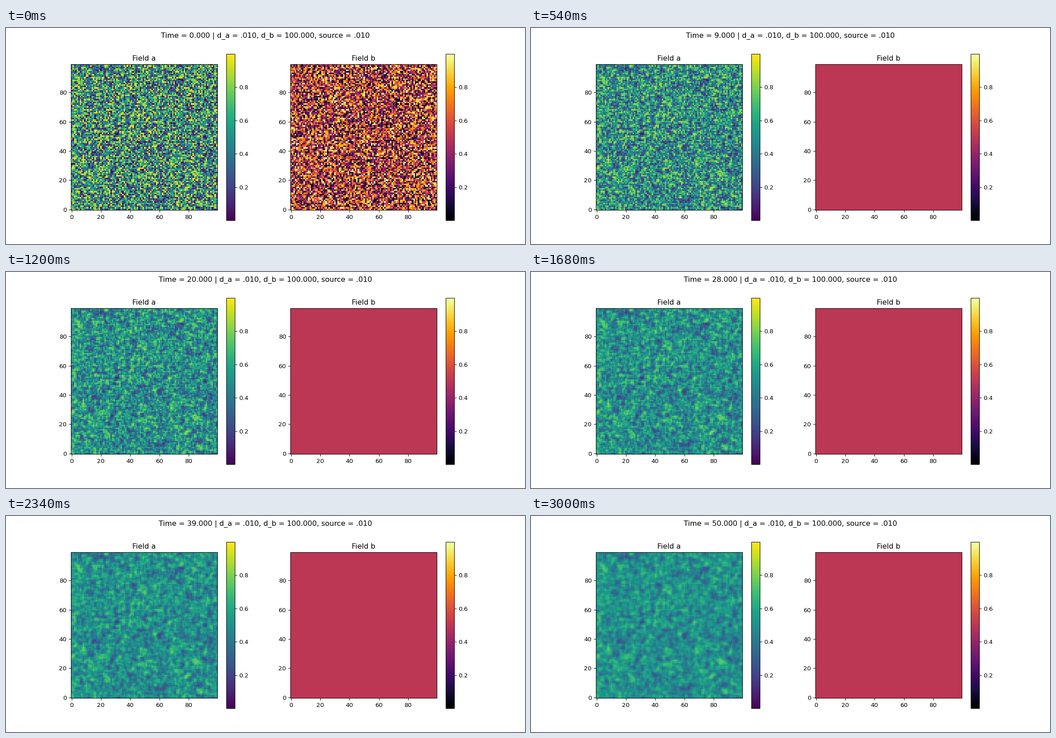
Write a matplotlib script that moves like this. It is 1159 px wide and 483 px high and loops after 3060 ms.

```python
import numpy as np
import matplotlib.pyplot as plt
from matplotlib.animation import FuncAnimation

SIZE = 100
D_A, D_B, SOURCE = 0.01, 100.0, 0.01
FRAMES, INTERVAL = 51, 60

rng = np.random.default_rng(7)
start_a, start_b = rng.random((2, SIZE, SIZE))

# Eigenvalues of the five-point Laplacian on a periodic grid.
wave = 2 - 2 * np.cos(2 * np.pi * np.fft.fftfreq(SIZE))
laplacian = -(wave[:, None] + wave[None, :])


def diffuse(field, rate, time):
    spectrum = np.fft.fft2(field) * np.exp(rate * time * laplacian)
    return np.fft.ifft2(spectrum).real


def short(value):
    return f"{value:.3f}".lstrip("0")


def heading(time):
    return (f"Time = {time:.3f} | d_a = {short(D_A)}, "
            f"d_b = {short(D_B)}, source = {short(SOURCE)}")


plt.rcParams["font.family"] = "DejaVu Sans"
# 12 x 5 inches at this dpi gives a canvas of 1159 x 483 pixels.
fig, axes = plt.subplots(1, 2, figsize=(12, 5), dpi=96.6)


def add_panel(ax, field, cmap, title):
    image = ax.imshow(field, cmap=cmap, origin="lower")
    ax.set_title(title)
    fig.colorbar(image, ax=ax)
    return image


image_a = add_panel(axes[0], start_a, "viridis", "Field a")
image_b = add_panel(axes[1], start_b, "inferno", "Field b")
suptitle = fig.suptitle(heading(0))


def update(time):
    image_a.set_data(diffuse(start_a, D_A, time))
    image_b.set_data(diffuse(start_b, D_B, time))
    suptitle.set_text(heading(time))
    return image_a, image_b, suptitle


animation = FuncAnimation(fig, update, frames=FRAMES, interval=INTERVAL,
                          repeat=True, repeat_delay=0, blit=False)
plt.show()
```
